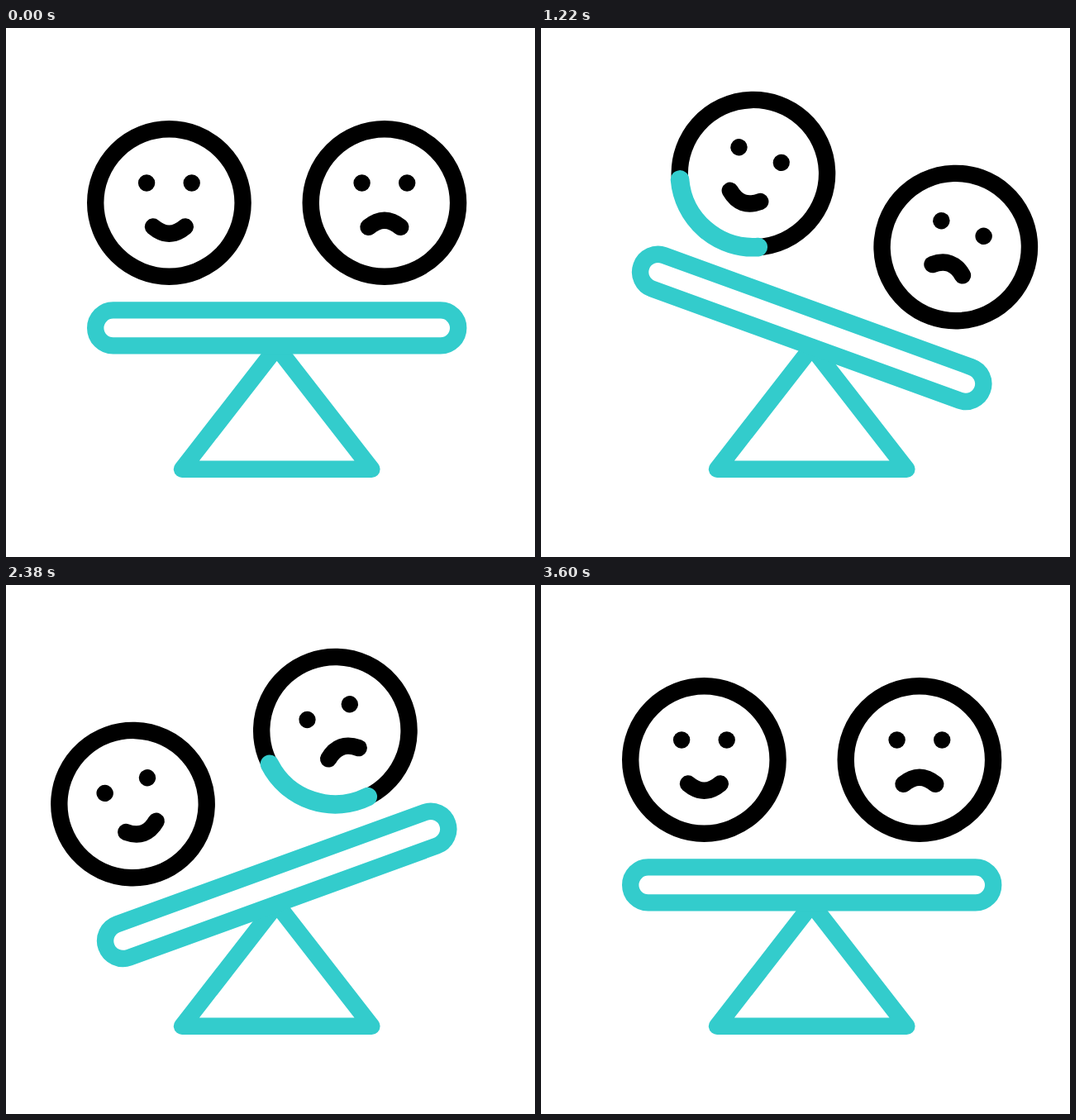
An HTML page that plays this animation: 640x640 px, repeating every 3.62 s.

```html
<!DOCTYPE html>
<html lang="en">
<head>
<meta charset="utf-8">
<title>Mood balance</title>
<style>
  html, body { margin: 0; height: 100%; overflow: hidden; background: #fff; }
  svg { display: block; width: 100vw; height: 100vh; }
  .line { fill: none; stroke-width: 20.4; stroke-linecap: round; stroke-linejoin: round; }
  .ink { stroke: #000; }
  .teal { stroke: #3cc; }
  .glow { stroke-width: 22.6; }
</style>
</head>
<body>
<svg viewBox="0 0 640 640">
  <defs>
    <g id="head">
      <circle class="line ink" r="89.2"/>
      <circle cx="-27.3" cy="-24" r="10.2"/>
      <circle cx="27.3" cy="-24" r="10.2"/>
    </g>
  </defs>
  <path class="line teal" d="M213 533.8H442.4L327.7 386.2Z"/>
  <g id="scale">
    <rect class="line teal" x="108.2" y="341.4" width="439" height="43" rx="21.5"/>
    <g transform="translate(197.4 211.5)">
      <use href="#head"/>
      <path class="line ink" d="M-19.4 29Q0 45.4 19.4 29"/>
      <path class="line teal glow" id="happy"/>
    </g>
    <g transform="translate(457.9 211.5)">
      <use href="#head"/>
      <path class="line ink" d="M-19.4 29.4Q0 13 19.4 29.4"/>
      <path class="line teal glow" id="sad"/>
    </g>
  </g>
</svg>
<script>
  const LOOP = 3620, SWING = 1200, LAG = 200, RADIUS = 89.2, ORIGIN = 30;
  const [scale, happy, sad] = ['scale', 'happy', 'sad'].map(id => document.getElementById(id));

  const clamp = x => Math.min(1, Math.max(0, x));
  const ease = x => (x = clamp(x), x * x * (3 - 2 * x));

  function tilt(t) {
    if (t < SWING) return 20 * ease(t / SWING);
    if (t < 2 * SWING) return 20 - 40 * ease(t / SWING - 1);
    return -20 + 20 * ease(t / SWING - 2);
  }

  // Point on the ring after a share of one counterclockwise turn
  function ringPoint(share) {
    const a = (ORIGIN - 360 * share) * Math.PI / 180;
    return (RADIUS * Math.sin(a)).toFixed(3) + ' ' + (-RADIUS * Math.cos(a)).toFixed(3);
  }

  // Arc whose tail follows its tip, fading in and out at the ends
  function sweep(el, t) {
    const tip = ease(t / SWING), tail = ease((t - LAG) / SWING);
    const alpha = Math.min(clamp(t / LAG), clamp((SWING + LAG - t) / LAG));
    el.setAttribute('d', `M${ringPoint(tail)}A${RADIUS} ${RADIUS} 0 0 0 ${ringPoint(tip)}`);
    el.setAttribute('opacity', alpha);
  }

  function draw() {
    const t = performance.now() % LOOP;
    scale.setAttribute('transform', `rotate(${tilt(t)} 327.7 362.9)`);
    sweep(happy, t - 500);
    sweep(sad, t - 1700);
    requestAnimationFrame(draw);
  }
  draw();
</script>
</body>
</html>
```
